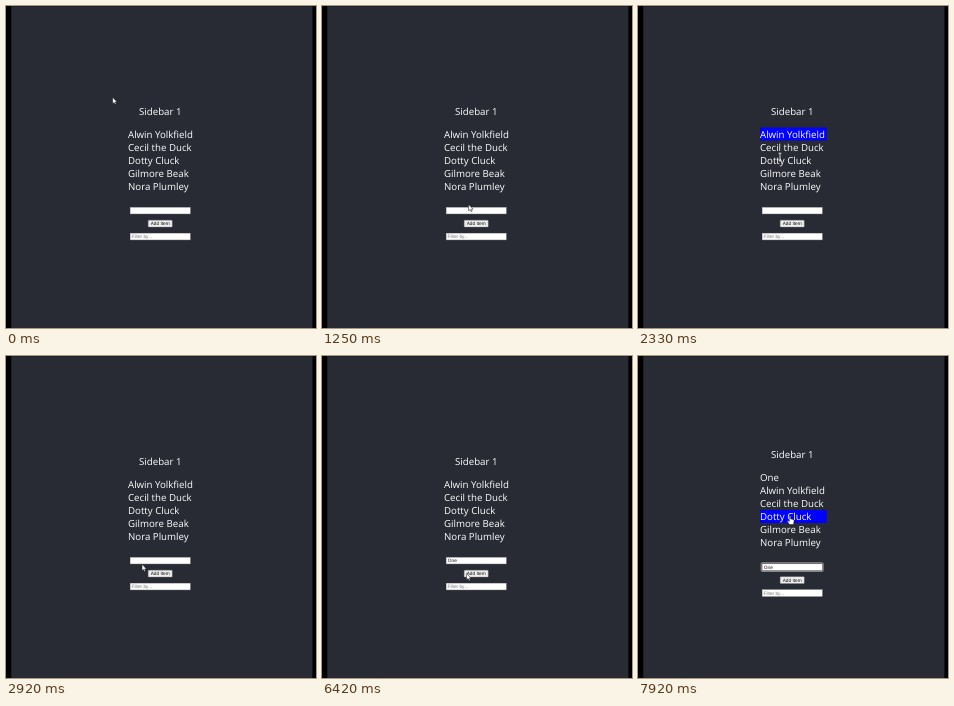
These frames come from a looping animation (310x322 px, 8000 ms). An HTML page:

```html
<!DOCTYPE html>
<html lang="en">
<head>
<meta charset="utf-8">
<title>Sidebar</title>
<style>
  html, body { margin: 0; width: 100%; height: 100%; overflow: hidden; background: #000; }
  svg { display: block; width: 310px; height: 322px; text-rendering: geometricPrecision; }
  .big { font: 9.7px "Open Sans", "Noto Sans", sans-serif; fill: #fff; }
  .small { font: 4.75px "Liberation Sans", Arial, sans-serif; fill: #111; }
  .field { fill: #fff; stroke: #b4b4ba; stroke-width: .4; }
  #ring { fill: #111; stroke: #d8d8d8; stroke-width: .7; }
  #cursor path { fill: #fff; stroke: #111; stroke-width: .5; stroke-linejoin: round; }
  #cursor #beam { fill: none; stroke: #fff; stroke-width: .8; }
</style>
</head>
<body>
<svg viewBox="0 0 310 322">
  <rect x="5.3" width="301.1" height="322" fill="#282b34"/>
  <rect x="5.3" width="301.1" height="1" fill="#20222a"/>
  <g id="head">
    <text class="big" x="154.3" y="108.7" text-anchor="middle">Sidebar 1</text>
    <rect id="mark" x="122" y="121.5" width="66.5" height="13" fill="#00f"/>
    <g id="list"></g>
  </g>
  <g id="form">
    <rect id="ring" x="123.2" y="200.4" width="61.9" height="8.4" rx=".8"/>
    <rect class="field" x="124.2" y="201.4" width="60" height="6.5"/>
    <text class="small" id="typed" x="125.8" y="206.4"></text>
    <path id="caret" d="M0 202.3v5" stroke="#111" stroke-width=".5"/>
    <rect x="142.2" y="214.2" width="24" height="6.8" rx=".6" fill="#efefef" stroke="#8a8a8a" stroke-width=".4"/>
    <text class="small" x="154.2" y="219.3" text-anchor="middle">Add Item</text>
    <rect class="field" x="124.2" y="227.2" width="60" height="6.7"/>
    <text class="small" x="125.6" y="232.1" style="fill:#757575">Filter by...</text>
  </g>
  <g id="cursor">
    <path id="arrow" d="M0 0V6.4L1.5 5.1 2.5 7.3 3.6 6.8 2.6 4.7H4.5Z"/>
    <path id="beam" d="M-1.4-3.8H1.4M0-3.8V3.8M-1.4 3.8H1.4"/>
    <path id="hand" d="M-.7 0Q0-.7 .7 0V3L3.6 3.7Q4.3 4 4.1 5L3.5 8.5H-.6L-2.7 5.3Q-2.6 4.3-1.7 4.7L-.7 5.6Z"/>
  </g>
</svg>
<script>
const $ = id => document.getElementById(id);
const LOOP = 8000, STEP = 1000 / 12, ROW = 13;
const ADD = 6660;
const names = ["Alwin Yolkfield", "Cecil the Duck", "Dotty Cluck", "Gilmore Beak", "Nora Plumley"];

// Pointer stops: time, x, y
const stops = [
  [0, 106.6, 91.3], [340, 106.6, 91.3], [1250, 146.6, 198.4], [1750, 148, 109], [2000, 146, 129],
  [2330, 142, 151], [2910, 136, 208.3], [3250, 148, 205], [3500, 148, 205], [4083, 156.6, 193.3],
  [5670, 156.6, 193.3], [6250, 144.6, 217.5], [6750, 144.6, 217.5], [7083, 150, 211],
  [7250, 150, 211], [7910, 152, 160], [8000, 152, 160]
];

const show = (id, on) => $(id).setAttribute("visibility", on ? "visible" : "hidden");
const between = (v, a, b) => v >= a && v < b;

function pointer(t) {
  const i = Math.max(1, stops.findIndex(s => s[0] > t));
  const [t0, x0, y0] = stops[i - 1], [t1, x1, y1] = stops[i];
  const p = (t - t0) / (t1 - t0), e = p * p * (3 - 2 * p);
  return [x0 + (x1 - x0) * e, y0 + (y1 - y0) * e];
}

function caretOn(t) {
  const focus = [3250, 5160, 5320, 5740, 7160].filter(s => s <= t).pop();
  return (t - focus) % 1000 < 495;
}

function fillList(items) {
  $("list").innerHTML = items.map((name, i) =>
    `<text class="big" x="122" y="${131.6 + i * ROW}">${name}</text>`).join("");
}

let wasAdded = null;
function draw(now) {
  const t = Math.floor((now % LOOP + 5) / STEP) * STEP;
  const added = t >= ADD, shift = added ? 6.5 : 0;
  const items = added ? ["One", ...names] : names;
  if (added !== wasAdded) fillList(items);
  wasAdded = added;

  $("head").setAttribute("transform", `translate(0 ${-shift})`);
  $("form").setAttribute("transform", `translate(0 ${shift})`);

  const [x, y] = pointer(t);
  const top = 121.5 - shift;
  const row = Math.floor((y - top) / ROW);
  const overList = between(x, 122, 188) && between(row, 0, items.length);
  // The first row stays lit while the pointer leaves the list
  const held = between(t, 1910, 2910);
  show("mark", held || overList);
  $("mark").setAttribute("y", 121.5 + (held ? 0 : row) * ROW);

  const focused = between(t, 3250, 6320) || t >= 7160;
  const text = "One".slice(0, [5160, 5320, 5740].filter(s => t >= s).length);
  $("typed").textContent = text;
  show("ring", focused);
  show("caret", focused && caretOn(t));
  $("caret").setAttribute("transform",
    `translate(${126 + (text ? $("typed").getComputedTextLength() : 0)} 0)`);

  const overField = between(x, 124, 184) && between(y - shift, 201.5, 208);
  const kind = overField || overList && !added ? "beam" : overList ? "hand" : "arrow";
  for (const id of ["arrow", "beam", "hand"]) show(id, id === kind);
  $("cursor").setAttribute("transform", `translate(${x} ${y})`);
}

const start = performance.now();
function tick() {
  draw(performance.now() - start);
  requestAnimationFrame(tick);
}
tick();
</script>
</body>
</html>
```
